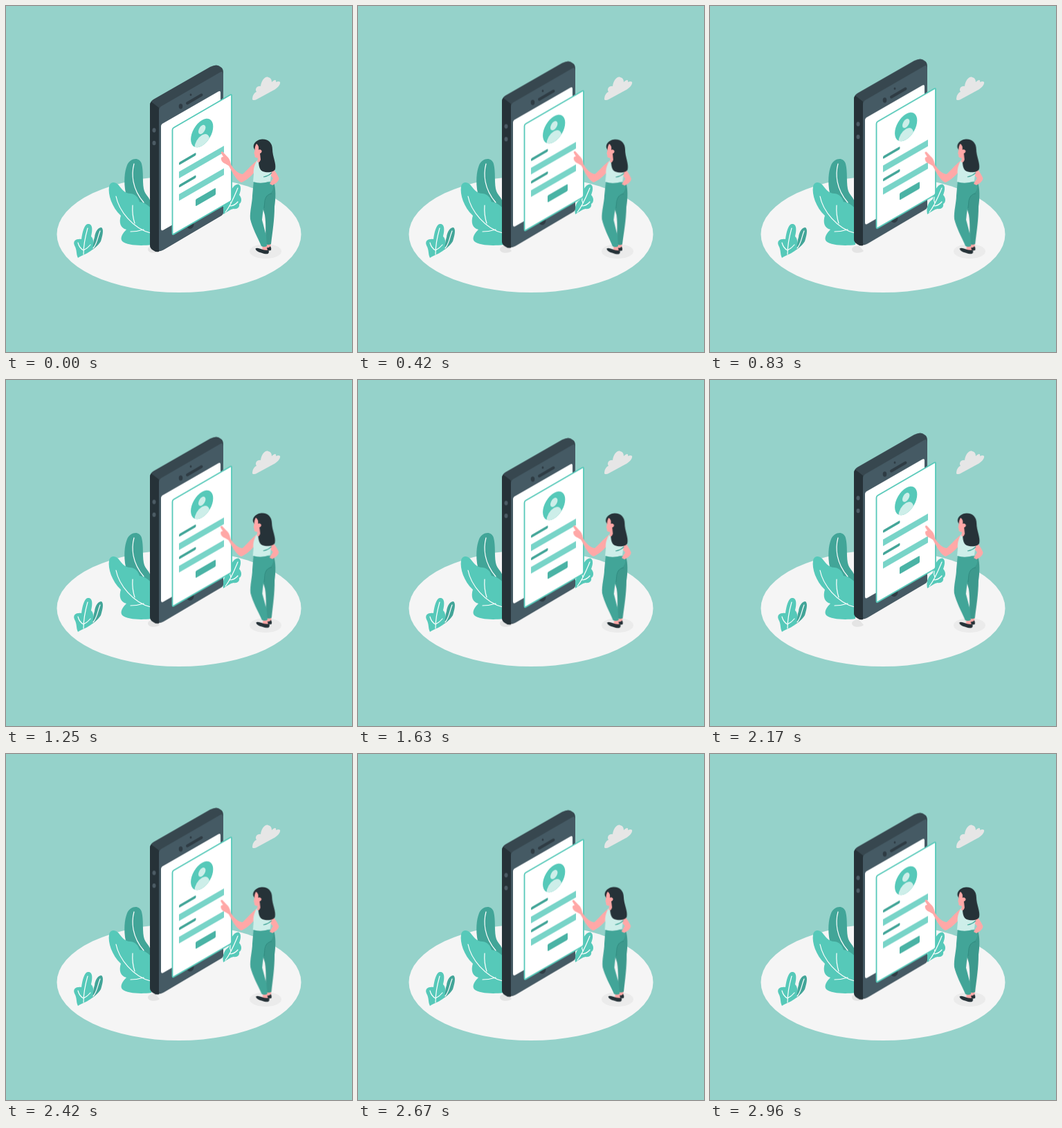
An HTML page that plays this animation: 500x500 px, repeating every 3000 ms.

```html
<!DOCTYPE html>
<html lang="en">
<head>
<meta charset="utf-8">
<title>Profile form</title>
<style>
  html, body { margin: 0; width: 100%; height: 100%; overflow: hidden; background: #95d2ca; }
  svg { display: block; width: 100%; height: 100%; }
  .teal { fill: #56c9b9; }
  .deep { fill: #42a598; }
  .ink { fill: #263238; }
  .skin { fill: #ffa8a7; }
  .vein { fill: none; stroke: #fff; stroke-width: 1.2; stroke-linecap: round; }
  #woman { transform-origin: 352px 275px; }
</style>
</head>
<body>
<svg viewBox="0 0 500 500">
  <defs>
    <clipPath id="disc"><circle r="18.6"/></clipPath>
  </defs>

  <ellipse cx="250" cy="330" rx="176.5" ry="84" fill="#f5f5f5"/>
  <path fill="#e6e6e6" d="M356 135C356 130 358 126 362 124C359 120 363 115 368 116C369 107 375 101 379 103C383 104 384 107 384 110C388 106 391 106 390 110C394 108 397 109 396 112C395 116 390 120 386 122L363 134.500C360 136 357 137 356 135Z"/>
  <ellipse cx="375" cy="354.500" rx="23" ry="10.500" fill="#ebebeb"/>
  <path fill="#e4e4e4" d="M205 352C205 348 210 346 216 347L222 354C218 358 206 358 205 352Z"/>

  <!-- plants -->
  <path class="deep" d="M209 293C196 291 184 280 173 270C170 255 171 240 175 230C180 219 193 218 196 228C199 240 197 252 199 264C201 274 208 276 209 284Z"/>
  <path class="vein" d="M185 228C181 243 182 264 199 284"/>
  <path class="teal" d="M210 345C195 347 175 346 168 340C164 335 169 328 174 323C165 321 163 312 166 303C153 291 147 272 149 261C150 254 157 253 162 258C167 264 171 271 180 271C188 272 191 277 193 283C200 284 206 288 210 293Z"/>
  <path class="vein" d="M159 275C163 296 184 322 209 328M183 288Q182 302 186 314M180 326Q190 326 199 323"/>
  <path class="teal" d="M104 364C101 358 103 353 99 346C96 339 102 336 109 337C110 328 113 316 118 315C126 314 125 325 123 333C127 336 127 345 125 352C118 358 110 360 104 364Z"/>
  <path class="vein" d="M118 321C114 335 112 345 112 359M104 342Q106 350 112 353M122 345Q118 350 112 353"/>
  <path class="deep" d="M125 352C126 345 126 340 128 334C129 326 133 320 138 320C142 323 139 333 137 340C133 346 128 350 125 352Z"/>
  <path class="vein" d="M136 325C132 335 132 343 126 350"/>
  <path class="teal" d="M314 301C312 290 316 283 322 279C323 268 329 257 336 257.500C341 260 339 268 337 273C341 277 341 284 337 286C338 291 334 294 329 293C324 294 320 297 314 301Z"/>
  <path class="vein" d="M317 298C325 288 330 275 335 263M325 285Q323 281 324 276M323 289Q330 289 335 283"/>

  <g id="phone">
    <path fill="#37474f" d="M208 144Q208 138 213 135L295 88Q305 83 310 88Q314 90 314 96V298Q314 301 311 303L228 352Q219 357 213 353Q208 351 208 345Z"/>
    <path class="ink" d="M208 144Q208 140 210 138.500L221 147V355Q216 356 212 352.500Q208 350 208 345Z"/>
    <path fill="#455a64" d="M221 151Q221 147 225 144.500L309 96Q314 93 314 99V297Q314 301 311 303L228 352Q221 356 221 350Z"/>
    <g fill="#4c5b64">
      <ellipse cx="214" cy="179.500" rx="2.500" ry="3.300"/>
      <ellipse cx="214" cy="198" rx="2.500" ry="3.300"/>
    </g>
    <path d="M262 140.500L282.500 128.500" stroke="#2f3c44" stroke-width="4" stroke-linecap="round"/>
    <g fill="#2f3c44">
      <ellipse cx="252.500" cy="145" rx="2.800" ry="3.700"/>
      <ellipse cx="267" cy="128.300" rx="1.300" ry="1.700"/>
      <ellipse cx="266" cy="315.500" rx="5.500" ry="6.500"/>
    </g>
    <path fill="#fff" d="M224 174Q224 171 227 169.500L307 123.500Q310 122 310 125V273Q310 276 307 278L227 324Q224 325.500 224 322Z"/>

    <path fill="#fff" stroke="#56c9b9" stroke-width="1.800" stroke-linejoin="round" d="M240.500 179Q240.500 177 242.500 175.800L324 128.500Q326 127.300 326 129.500V279Q326 281.200 324 282.400L242.500 329.600Q240.500 330.800 240.500 328.500Z"/>
    <g transform="matrix(.866 -.5 0 1 283.200 183.500)">
      <circle r="18.600" class="teal"/>
      <g fill="#cdeee9" clip-path="url(#disc)">
        <circle cy="-5" r="6"/>
        <circle cy="15.500" r="12.500"/>
      </g>
    </g>
    <g id="fields"></g>
  </g>

  <g id="woman">
    <path class="skin" d="M371 344L378 345V354L370 353ZM377 341L383 342L382 350L377 349Z"/>
    <path class="ink" d="M377 349Q380 350 382 347Q384 350 383 353L378 354ZM360.500 350.500C364 348 369 353 378 353L380 354.500C380 358 378 359 373 358C367 356 361 355 360.500 350.500Z"/>
    <path fill="#3d998d" d="M370 256L387 255C390 264 390 277 388 290C388 309 385 327 383 344Q379 346 375 344C375 329 376 315 374 302L367 277Z"/>
    <path class="deep" d="M358 252L386 255C388 263 385 271 376 275C373 286 371 297 370 309L376 332L377 347Q373 349 369 347C363 333 356 321 353 308C352 297 356 284 356 274Z"/>
    <path d="M384 271Q376 272 374 281L373 292" fill="none" stroke="#2f897e" stroke-width=".9"/>
    <path class="skin" d="M383 234C388 236 392 243 394.500 249C394 254 389 257 385 259L381 257L386 249L381 243Z"/>
    <path class="skin" d="M362 224C354 230 349 237 342 243C335 242 329 236 325 229C324 223 322 219 319 217L313 210.500Q310 210 311 213L314 218Q310 218 311 222Q312 226 317 228L322 231C328 242 333 252 340 255C348 252 355 245 361 238Z"/>
    <path fill="#cdeee9" d="M363 223C359 229 357 237 358 243L357 254Q369 258 382 253L384 236L370 223Z"/>
    <path d="M372 247Q379 246 384 241" fill="none" stroke="#42a598" stroke-width="1.200"/>
    <path class="ink" d="M359 207C355 201 361 193 370 192.500C379 192 385 198 385 207C385 217 391 228 389 236C386 241 377 241 371 239C365 236 365 228 365 219Z"/>
    <path class="skin" d="M362 199C359 203 360 208 358.500 213Q360 215 359.500 218Q362 220 364 219.500L363 225Q366 228 368 222L367 213Q370 212 369.500 209Q367 206 365 208Q366 202 362 199Z"/>
  </g>
</svg>
<script>
  const NS = "http://www.w3.org/2000/svg";

  // Bars lie on the card plane: x runs along the edge, y straight down.
  function bar(x, y, w, h, r, fill) {
    const el = document.createElementNS(NS, "rect");
    const attrs = { width: w / .866, height: h, rx: r, fill,
      transform: `matrix(.866 -.5 0 1 ${x} ${y})` };
    for (const key in attrs) el.setAttribute(key, attrs[key]);
    document.getElementById("fields").append(el);
  }

  for (const dy of [0, 32.5]) {
    bar(250, 226 + dy, 24.5, 4, 1.5, "#42a598");
    bar(250, 239.5 + dy, 65, 9.5, 0, "#78d4c8");
  }
  bar(274, 279.5, 29, 10, 1.5, "#4ab3a5");

  const loop = { duration: 1500, iterations: Infinity, easing: "linear" };
  const play = (id, steps) => document.getElementById(id).animate(
    steps.map(([offset, transform]) => ({ offset, transform })), loop).startTime = 0;

  play("phone", [
    [0, "translateY(0px)"], [.5, "translateY(-10px)"], [1, "translateY(0px)"]
  ]);
  play("woman", [
    [0, "rotate(0deg)"], [.25, "rotate(1deg)"], [.75, "rotate(-1deg)"], [1, "rotate(0deg)"]
  ]);
</script>
</body>
</html>
```
